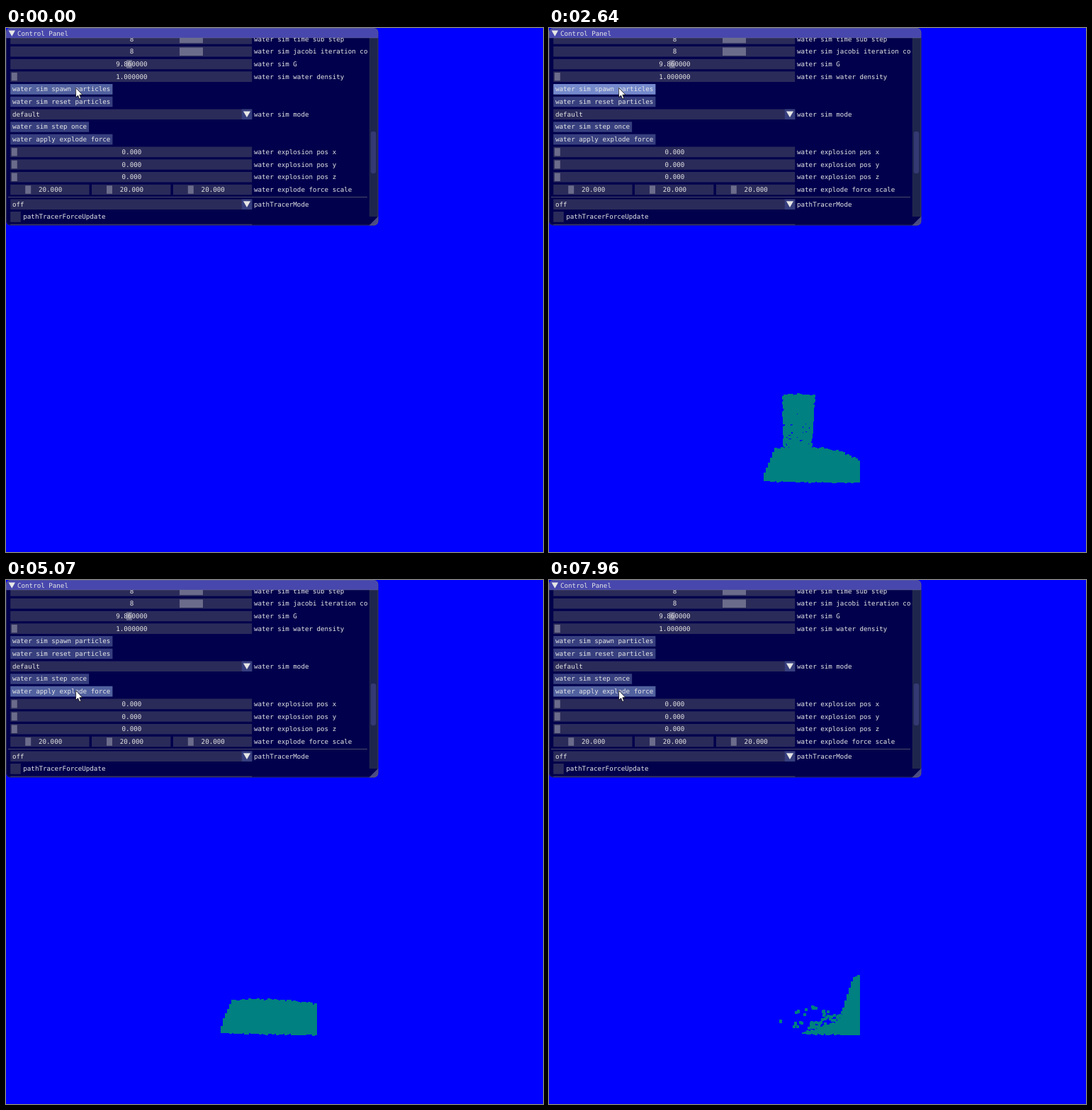
Write an HTML page with a canvas that moves like this. It is 758 px wide and 739 px high and loops after 8 s.

```html
<!DOCTYPE html>
<html>
<head>
<meta charset="utf-8">
<style>
html, body { margin: 0; width: 100%; height: 100%; overflow: hidden; background: #00f; }
canvas { display: block; }
</style>
</head>
<body>
<canvas id="stage" width="758" height="739"></canvas>
<script>
const ctx = document.getElementById('stage').getContext('2d');
const LOOP = 8000;
const C = {
  text: '#e6e6e6', frame: '#2b2b5a', grab: '#6b6b8b', button: '#373f7e',
  hover: '#51619f', active: '#758acc', water: '#008080'
};

// When the spawn button is held, and when the explode button is let go.
const PRESS = 530, RELEASE = 4430, BLASTS = [6310, 7040, 7560];

const rand = (i, k) => {
  const v = Math.sin(i * 12.9898 + k * 78.233) * 43758.5453;
  return v - Math.floor(v);
};
const clamp = v => Math.max(0, Math.min(1, v));
const mix = (a, b, k) => a + (b - a) * k;
const smooth = v => v * v * (3 - 2 * v);
const within = (t, a, b) => t >= a && t < b;

// ---------- control panel ----------

const LEFT = 6.2, WIDE = 341, LABEL = 350, HEIGHT = 14.6;
const row = k => 15.55 + 17.7 * k;

function box(x, y, w, h, color, radius = 0) {
  ctx.fillStyle = color;
  ctx.beginPath();
  ctx.roundRect(x, y, w, h, radius);
  ctx.fill();
}

function shape(points, color) {
  ctx.fillStyle = color;
  ctx.beginPath();
  for (let i = 0; i < points.length; i += 2) ctx.lineTo(points[i], points[i + 1]);
  ctx.closePath();
  ctx.fill();
}

const bar = (x, cy, w, color) => box(x, cy - HEIGHT / 2, w, HEIGHT, color);
const arrow = (x, y, r) =>
  shape([x - .87 * r, y - .75 * r, x + .87 * r, y - .75 * r, x, y + .75 * r], C.text);

function label(str, x, cy, align = 'left') {
  ctx.fillStyle = C.text;
  ctx.textAlign = align;
  ctx.fillText(str, x, cy + 3);
}

function slider(cy, value, grabX, grabW = 8, x = LEFT, w = WIDE) {
  bar(x, cy, w, C.frame);
  box(grabX, cy - 5.7, grabW, 11.4, C.grab);
  label(value, x + w / 2 + .7, cy, 'center');
}

function namedSlider(k, name, value, grabX = 7.8, grabW = 8) {
  slider(row(k), value, grabX, grabW);
  label(name, LABEL, row(k));
}

function button(k, str, color = C.button) {
  bar(LEFT, row(k), str.length * 5.54 + 5.7, color);
  label(str, 9, row(k));
}

function combo(cy, value, name) {
  bar(LEFT, cy, WIDE, C.frame);
  bar(332.8, cy, HEIGHT, C.button);
  arrow(340, cy, 5.8);
  label(value, 9, cy);
  label(name, LABEL, cy);
}

function drawRows(t) {
  const spawn = within(t, PRESS, RELEASE) ? C.active : t < RELEASE + 120 ? C.hover : C.button;
  const step = within(t, 4570, 4800) ? C.hover : C.button;
  const pressed = BLASTS.some(end => within(t, end - 150, end));
  const explode = pressed ? C.active : t > 4900 ? C.hover : C.button;

  namedSlider(0, 'water sim time sub step', '8', 245, 33);
  namedSlider(1, 'water sim jacobi iteration count', '8', 245, 33);
  namedSlider(2, 'water sim G', '9.860000', 170);
  namedSlider(3, 'water sim water density', '1.000000');
  button(4, 'water sim spawn particles', spawn);
  button(5, 'water sim reset particles');
  combo(row(6), 'default', 'water sim mode');
  button(7, 'water sim step once', step);
  button(8, 'water apply explode force', explode);
  [...'xyz'].forEach((axis, i) => namedSlider(9 + i, 'water explosion pos ' + axis, '0.000'));
  for (let i = 0; i < 3; i++) {
    const x = LEFT + i * 114.8;
    slider(row(12), '20.000', x + 21, 8, x, 111.4);
  }
  label('water explode force scale', LABEL, row(12));
  box(3, 238, 507, 1, '#4c4c6b');
  combo(248.7, 'off', 'pathTracerMode');
  bar(LEFT, 266.4, HEIGHT, C.frame);
  label('pathTracerForceUpdate', 24.3, 266.4);
  box(LEFT, 276.6, WIDE, 2, C.frame);
}

function drawPanel(t) {
  ctx.font = '9.2px "DejaVu Sans Mono", monospace';
  ctx.textRendering = 'geometricPrecision';

  ctx.save();
  ctx.beginPath();
  ctx.roundRect(0, 0, 525.4, 278.4, 6);
  ctx.clip();
  box(0, 0, 526, 279, '#00004c');
  box(0, 0, 526, 14, '#4747ad');
  arrow(8.3, 7.6, 5.4);
  label('Control Panel', 16, 8);
  box(512.8, 14, 13, 252, '#1f264d');
  box(514.8, 146, 7.5, 59, '#343973', 3);
  shape([526, 265, 526, 279, 512, 279], '#4c4c82');

  ctx.beginPath();
  ctx.rect(0, 14, 510, 264);
  ctx.clip();
  drawRows(t);
  ctx.restore();

  ctx.strokeStyle = 'rgba(128,128,128,.4)';
  ctx.lineWidth = .8;
  ctx.beginPath();
  ctx.roundRect(.4, .4, 524.6, 277.6, 5.6);
  ctx.moveTo(1, 14);
  ctx.lineTo(524, 14);
  ctx.stroke();
}

function drawCursor(t) {
  const k = 1 - (1 - clamp((t - RELEASE) / 430)) ** 4;
  ctx.save();
  ctx.translate(98.6 + 2 * Math.sin(Math.PI * k), mix(84.5, 156, k));
  shape([0, 0, 0, 13.3, 3, 10.6, 5.1, 15.5, 7.2, 14.6, 5.2, 9.8, 9.2, 9.6], '#fff');
  ctx.strokeStyle = '#000';
  ctx.lineWidth = .7;
  ctx.stroke();
  ctx.restore();
}

// ---------- water ----------

const FIRST = 830, LANDED = 1180, RATE = 3.6;
const BASIN = 303, SPAN = 136;

const drop = (x, y) => ctx.fillRect(Math.round(x), Math.round(y), 4, 4);

function drawColumn(t) {
  const end = (Math.min(t, RELEASE) - FIRST) * RATE;
  const start = Math.max(0, Math.floor((t - 400 - FIRST) * RATE));
  for (let i = start; i < end; i++) {
    const birth = FIRST + i / RATE;
    if (rand(i, 5) < .6 * clamp((birth - 2800) / 1500)) continue;
    const age = (t - birth) / 1000;
    const y = 515 + 9 * rand(i, 1) + 30 * age + 860 * age * age;
    if (y > 634) continue;
    const fall = (y - 515) / 120;
    const stray = rand(i, 3) < .015 ? 12 * (rand(i, 4) - .4) : 0;
    drop(329 + fall + rand(i, 2) * (43 - 7 * fall) + stray, y);
  }
}

// Each blast throws the water against the right wall; it then sinks back.
const pushAt = t => Math.max(...BLASTS.map(start => {
  const age = t - start;
  return smooth(clamp(age / 400)) * Math.exp(-Math.max(0, age - 400) / 700);
}));

// Water depth at x: a mound that widens until it fills the basin.
function restDepth(x, t) {
  const age = t - LANDED;
  const reach = 54 * (age / 390) ** .6 * (x < 348 ? .82 : 1);
  const level = 45.5 + 4 * Math.sin(Math.PI * (x - BASIN) / SPAN);
  const mound = level * (1 - Math.exp(-age / 200)) * (1 - (Math.abs(x - 348) / reach) ** 4);
  return Math.min(mound, 8 + (x - BASIN) * 2.5);
}

const pushedDepth = x => 30 * clamp((x - 352) / 86) + 54 * smooth(clamp((x - 406) / 26));

function drawPool(t, push) {
  if (t <= LANDED) return;
  const tick = Math.floor(t / 70) % 50;
  for (let x = BASIN; x < BASIN + SPAN - 3; x += 3) {
    const depth = mix(restDepth(x + 1.5, t), pushedDepth(x + 1.5), push);
    if (depth < 2) continue;
    const floor = 639.5 + (x - BASIN) / 54 + 2 * rand(x + tick, 6) - 1;
    const top = floor - depth + 2 * rand(x + tick, 7) - 1;
    ctx.fillRect(x, Math.round(top), 4, Math.round(floor) - Math.round(top));
  }
}

// Loose clumps trailing behind the pushed water.
function drawSpray(push) {
  const p = clamp((push - .3) / .7);
  for (let i = 0; p > 0 && i < 90; i++) {
    if (rand(i, 8) > p * 1.5) continue;
    const clump = Math.floor(i / 4);
    const along = Math.sqrt(rand(clump, 9));
    const x = 310 + 98 * along + 10 * rand(i, 11) - 12 * (1 - p);
    const y = 597 + 32 * rand(clump, 10) + 8 * rand(i, 12) + 12 * (1 - p);
    if (i % 4 < 1 + 4 * along) drop(x, Math.min(636, y));
  }
}

function drawWater(t) {
  const push = pushAt(t);
  ctx.fillStyle = C.water;
  drawColumn(t);
  drawPool(t, push);
  drawSpray(push);
}

const origin = performance.now();

function frame() {
  const t = (performance.now() - origin) % LOOP;
  ctx.fillStyle = '#00f';
  ctx.fillRect(0, 0, 758, 739);
  drawWater(t);
  drawPanel(t);
  drawCursor(t);
  requestAnimationFrame(frame);
}
frame();
</script>
</body>
</html>
```
